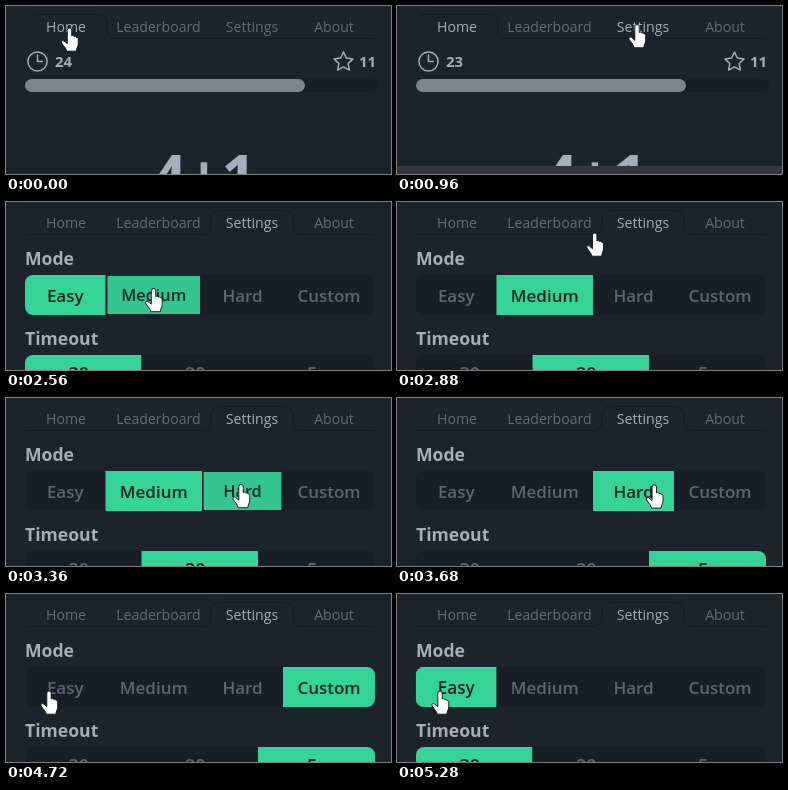
Recreate the animation shown at these times as an HTML page. Size 385 by 168 pixels, loop 5.76 s.

```html
<!DOCTYPE html>
<html lang="en">
<head>
<meta charset="utf-8">
<title>Quiz settings</title>
<style>
  html, body { margin: 0; width: 100%; height: 100%; overflow: hidden; background: #1d232a; }
  svg { display: block; width: 385px; height: 168px; font-family: "Open Sans", "Noto Sans", sans-serif; fill: #a6adbb; }
  .line { fill: none; stroke: #161b20; }
  .icon { fill: none; stroke: #a6adbb; stroke-width: 1.5; stroke-linecap: round; stroke-linejoin: round; }
  .tabs { font-size: 14.1px; text-anchor: middle; }
  .stat { font-size: 15px; font-weight: 700; }
  .sum { font-size: 61px; font-weight: 700; text-anchor: middle; }
  .head { font-size: 17.6px; font-weight: 700; }
  .option { font-size: 17px; font-weight: 600; text-anchor: middle; }
  .tall { font-size: 18px; }
</style>
</head>
<body>
<svg viewBox="0 0 385 168">
  <defs>
    <clipPath id="modesClip"><rect x="19" y="73" width="350" height="40" rx="8"/></clipPath>
    <clipPath id="timesClip"><rect x="19" y="153" width="350" height="40" rx="8"/></clipPath>
  </defs>

  <path id="tabLine" class="line"/>
  <g id="tabs" class="tabs"></g>

  <g id="home">
    <g class="icon">
      <circle cx="31.5" cy="55.5" r="9.6"/>
      <path d="M31.5 49v6.5h5"/>
      <path id="star"/>
    </g>
    <g class="stat">
      <text id="seconds" x="49" y="61"></text>
      <text x="370" y="61" text-anchor="end">11</text>
    </g>
    <rect x="19" y="73" width="354" height="13" rx="6.5" fill="#191e24"/>
    <rect id="bar" x="19" y="73" height="13" rx="6.5" fill="#7e838f"/>
    <text class="sum" x="198" y="192.5">4+1</text>
    <rect id="footer" y="160" width="385" height="8" fill="#37343e"/>
  </g>

  <g id="settings">
    <g class="head">
      <text x="19" y="63">Mode</text>
      <text x="19" y="143">Timeout</text>
    </g>
    <g id="modes" class="option"></g>
    <g id="times" class="option tall"></g>
  </g>

  <circle id="press" r="15" fill="#ff0" fill-opacity=".47"/>
  <path id="hand" fill="#fff" stroke="#111" stroke-width=".9" stroke-linejoin="round"
    d="M-2.2 2.1a2.2 2.1 0 0 1 4.4 0V8c.8-.8 2.2-.5 2.5.6c.8-.6 2.1-.2 2.3.9c1-.3 1.7.4 1.7 1.6V16
       c0 2.6-1.8 4-1.8 7.2H-2.8c-.4-3-2.8-4.6-5-8.2c-1-1.8.8-3.2 2.4-1.9l3.2 2.6z"/>
</svg>

<script>
const LOOP = 5760, STEP = 40;
const GREEN = [54, 211, 153], DARK = [25, 30, 36];
const INK = [8, 35, 26], GREY = [95, 102, 112];
const $ = id => document.getElementById(id);
const clamp = v => Math.max(0, Math.min(1, v));
const ease = v => v * v * (3 - 2 * v);
const mix = (a, b, k) => `rgb(${a.map((v, i) => v + (b[i] - v) * k)})`;
const show = (el, on) => { el.style.visibility = on ? 'visible' : 'hidden'; };

function add(parent, tag, attrs, text = '') {
  const el = document.createElementNS('http://www.w3.org/2000/svg', tag);
  for (const key in attrs) el.setAttribute(key, attrs[key]);
  el.textContent = text;
  return parent.appendChild(el);
}

const tabs = [['Home', 60], ['Leaderboard', 152.5], ['Settings', 246], ['About', 328]]
  .map(([label, x]) => add($('tabs'), 'text', { x, y: 25.5 }, label));

function makeOptions(id, labels, edges, top, baseline) {
  add($(id), 'rect', { x: 19, y: top, width: 350, height: 40, rx: 8, fill: `rgb(${DARK})` });
  return labels.map((label, i) => {
    const width = edges[i + 1] - edges[i], cx = edges[i] + width / 2, cy = top + 20;
    const g = add($(id), 'g', { 'clip-path': `url(#${id}Clip)` });
    const rect = add(g, 'rect', { x: edges[i], y: top, width, height: 40 });
    const text = add(g, 'text', { x: cx, y: baseline }, label);
    return { g, rect, text, cx, cy };
  });
}
const modes = makeOptions('modes', ['Easy', 'Medium', 'Hard', 'Custom'], [19, 99.5, 196, 277, 369], 73, 99.5);
const times = makeOptions('times', ['30s', '20s', '5s'], [19, 135.5, 252, 369], 153, 178);

const star = Array.from({ length: 10 }, (_, i) => {
  const r = i % 2 ? 4.9 : 10, a = i * Math.PI / 5;
  return [337.5 + r * Math.sin(a), 56 - r * Math.cos(a)];
});
$('star').setAttribute('d', `M${star.join('L')}Z`);

const HOME_LINE = 'M21.5 12.5a8 8 0 0 1 6-4H93a8 8 0 0 1 8 8V24.5a8 8 0 0 0 8 8H369';
const SETTINGS_LINE = 'M19 32.5H197a8 8 0 0 0 8-8V16.5a8 8 0 0 1 8-8H279a8 8 0 0 1 8 8V24.5a8 8 0 0 0 8 8H369';

// time, x, y of the fingertip
const path = [
  [80, 63.5, 22], [600, 240, 18.5], [1680, 240, 18.5], [1720, 236, 22.5], [2000, 126, 82],
  [2120, 147.5, 86.5], [2600, 147.5, 86.5], [2960, 205, 23], [3180, 235, 86.5], [3560, 235, 86.5],
  [3920, 321, 88], [4160, 321, 88], [4720, 43, 97]
];
// press, release, mode, timeout
const clicks = [
  [800, 960], [2400, 2560, 1, 1], [3200, 3360, 2, 2], [3960, 4080, 3, 2], [4920, 5080, 0, 0]
];

function pointerAt(t) {
  const i = path.findIndex(p => p[0] > t);
  if (i === 0) return path[0].slice(1);
  if (i < 0) return path[path.length - 1].slice(1);
  const [a, b] = [path[i - 1], path[i]];
  const k = ease((t - a[0]) / (b[0] - a[0]));
  return [a[1] + (b[1] - a[1]) * k, a[2] + (b[2] - a[2]) * k];
}

function popScale(age) {
  const k = clamp(age / 250);
  return k < .4 ? .96 + .06 * k / .4 : 1.02 - .02 * (k - .4) / .6;
}

function paint(option, level, scale = 1) {
  option.rect.setAttribute('fill', mix(DARK, GREEN, level));
  option.text.setAttribute('fill', mix(GREY, INK, level));
  option.g.setAttribute('transform',
    `translate(${option.cx} ${option.cy}) scale(${scale}) translate(${-option.cx} ${-option.cy})`);
}

function drawOptions(t) {
  let now = { mode: 0, time: 0, at: -1e4 }, before = now;
  for (const [, at, mode, time] of clicks) {
    if (mode !== undefined && t >= at) { before = now; now = { mode, time, at }; }
  }
  const age = t - now.at, fade = clamp(age / 200);
  const held = clicks.find(c => t >= c[0] && t < c[1]);
  modes.forEach((option, i) => {
    const level = i === now.mode ? .92 + .08 * fade : i === before.mode ? 1 - fade : 0;
    const scale = held && held[2] === i ? .96 : i === now.mode ? popScale(age) : 1;
    paint(option, level, scale);
  });
  times.forEach((option, i) => {
    const was = +(i === before.time), is = +(i === now.time);
    paint(option, was + (is - was) * fade);
  });
  return held;
}

function draw(t) {
  const onSettings = t >= 1000, secs = t < 360 ? 24 : 23;
  $('tabLine').setAttribute('d', onSettings ? SETTINGS_LINE : HOME_LINE);
  tabs.forEach((tab, i) => {
    const lit = i === (onSettings ? 2 : 0) || (i === 2 && t >= 520);
    tab.setAttribute('opacity', lit ? 1 : .53);
  });

  show($('home'), !onSettings);
  show($('footer'), t >= 960 && !onSettings);
  $('seconds').textContent = secs;
  $('bar').setAttribute('width', secs === 24 ? 280 : 270);

  show($('settings'), onSettings);
  $('settings').setAttribute('opacity', 1 - (1 - clamp((t - 960) / 360)) ** 2);

  const held = drawOptions(t);
  const at = `translate(${pointerAt(t)})`;
  show($('press'), !!held);
  $('press').setAttribute('transform', at);
  $('hand').setAttribute('transform', at);
}

const start = performance.now();
function tick() {
  const t = (performance.now() - start) % LOOP;
  draw(Math.floor(t / STEP) * STEP);
  requestAnimationFrame(tick);
}
tick();
</script>
</body>
</html>
```
